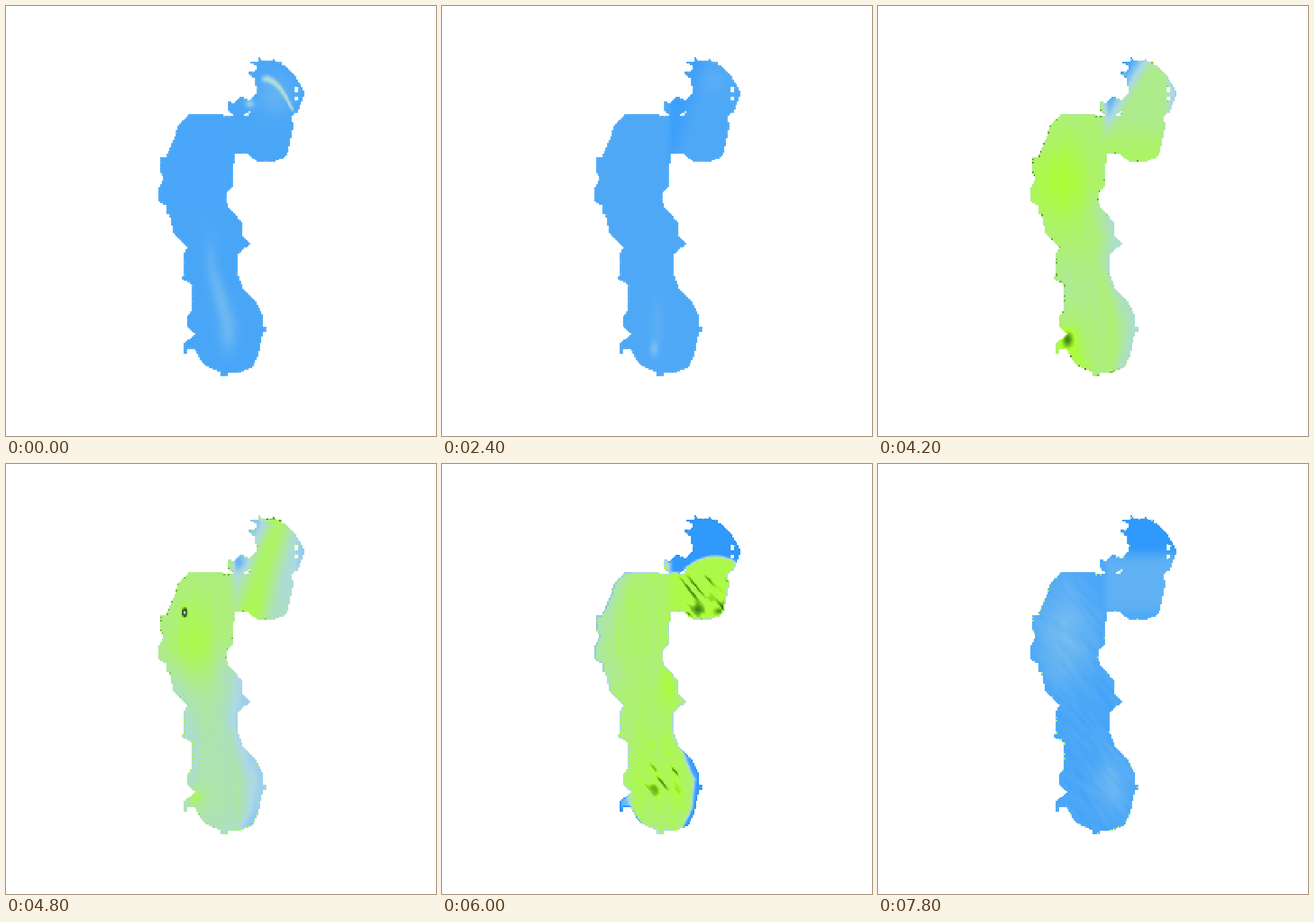
Recreate the animation shown at these times as an HTML page with a canvas. Size 748 px wide and 748 px high, loop 8 s.

```html
<!DOCTYPE html>
<html>
<head>
<meta charset="utf-8">
<style>
html, body { margin: 0; width: 100%; height: 100%; overflow: hidden; background: #fff; }
canvas { position: absolute; left: 265px; top: 89px; width: 253.9px; height: 554.8px; image-rendering: pixelated; }
</style>
</head>
<body>
<canvas id="lake" width="92" height="201"></canvas>
<script>
const CELL = 2.76, W = 92, H = 201, LEFT = 265, TOP = 89;
const STEP = 600, LOOP = 8000;
const ctx = document.getElementById('lake').getContext('2d');

// Shoreline key points; sampling on the grid makes the steps
const shore = [
  'M317 190L335 187H357L387 191H422V186H494L500 208L491 253L484 264L468 270H437L419 257H397L394 314L382 326L386 348L411 377L410 399L425 413L402 433V440H310V428L316 420L291 395L285 365L278 360L279 347L265 340V317L274 300L268 289V263H277L293 230L299 208Z',
  'M310 428H402V464L413 492L434 513L447 538V557H453V566H448L437 612L428 628L407 638H386L385 643H373L374 636L353 629L338 617L329 597H316V604H310V587L328 571L314 557V541L322 531V484L307 475V469H310Z',
  'M424 190V163L437 149L432 126L421 118V114H434L438 105L426 100V97H438L439 89H442L444 95L465 93L469 97H481V101L500 117L518 147V157L507 185L492 194Z',
  'M426 165L408 157L396 169H391V167H387V183L398 192H411L424 182Z'
].map(d => new Path2D(d));
const isles = new Path2D('M503 142H509V150H503ZM503 157H509V164H503Z');

// Blue, pale blue, lime, dark green, grey; anything higher is dry
const ramp = [[30, 144, 255], [173, 216, 230], [173, 255, 47], [24, 84, 16], [112, 112, 112]];
const DRY = 4.5;

const mix = (a, b, k) => a + (b - a) * k;
const ease = (a, b, v) => {
  const k = Math.min(1, Math.max(0, (v - a) / (b - a)));
  return k * k * (3 - 2 * k);
};
const bump = (p, x, y, rx, ry) => Math.exp(-(((p.x - x) / rx) ** 2 + ((p.y - y) / ry) ** 2));

let seed = 7;
const random = () => (seed = seed * 16807 % 2147483647) / 2147483647;

// Smooth noise in -1..1
const N = 64, grid = Array.from({ length: N * N }, () => random() * 2 - 1);
function noise(a, b) {
  const i = Math.floor(a), j = Math.floor(b), u = ease(0, 1, a - i), v = ease(0, 1, b - j);
  const at = (m, n) => grid[(n & 63) * N + (m & 63)];
  return mix(mix(at(i, j), at(i + 1, j), u), mix(at(i, j + 1), at(i + 1, j + 1), u), v);
}
const flow = p => noise(p.x / 9, p.y / 60);
const slant = p => noise((.77 * p.x - .64 * p.y) / 6, (.64 * p.x + .77 * p.y) / 32);

// Middle and half width of the main channel by height
const channel = [[190, 350, 40], [250, 338, 60], [320, 326, 60], [400, 356, 56], [450, 357, 47], [550, 385, 62], [600, 387, 55], [645, 390, 26]];
function across(x, y) {
  let i = 0;
  while (i < channel.length - 2 && channel[i + 1][0] < y) i++;
  const [y0, m0, h0] = channel[i], [y1, m1, h1] = channel[i + 1], k = (y - y0) / (y1 - y0);
  return (x - mix(m0, m1, k)) / mix(h0, h1, k);
}

// Level at a point p: s runs from left bank to right bank, bay is 1 in the northern bay
const states = [
  { at: 0, rim: .06, spot: .25, level(p) {
    const crease = 127 + 51 * ((p.x - 450) / 47) ** 2;
    const bay = .75 * Math.exp(-(((p.y - crease) / 6) ** 2)) * ease(440, 454, p.x) * ease(188, 176, p.y)
      + .18 * bump(p, 468, 155, 30, 35) + .5 * bump(p, 424, 170, 8, 7);
    const spine = Math.exp(-((p.s * 4) ** 2)) * ease(350, 520, p.y) * ease(630, 560, p.y);
    return .3 + mix(.24 * spine, bay, p.bay);
  } },
  { at: 2, rim: .03, spot: 1.5, level: () => .21 },
  { at: 4, rim: .05, spot: .2, level: p =>
    .34 - .13 * p.bay * ease(20, -20, p.x - 445 + (p.y - 130) * .3)
      + .07 * bump(p, 470, 130, 25, 20) + .3 * bump(p, 369, 596, 7, 13) + .08 * bump(p, 375, 550, 12, 40) },
  { at: 7, rim: -.12, spot: .9, level(p) {
    const bay = mix(.3, 1.5, ease(-10, 45, p.x - 440 + (p.y - 100) * .6))
      - .5 * ease(495, 516, p.x) + .2 * ease(190, 260, p.y);
    const right = ease(.4, 1, p.s) * ease(320, 380, p.y);
    const left = ease(.2, .9, -p.s) * ease(540, 580, p.y);
    const main = 1.6 + .35 * bump(p, 318, 310, 48, 75) - .4 * right + .25 * left
      - .15 * bump(p, 345, 490, 30, 50) + .9 * bump(p, 330, 580, 9, 14) + .06 * flow(p);
    return mix(main, bay, p.bay);
  } },
  { at: 9, rim: .12, spot: .9, level(p) {
    const off = p.x - 462 + (p.y - 130) * .28;
    const bay = 1.9 - 1.25 * ease(2, 48, off) - .75 * ease(2, 36, -off)
      - .7 * bump(p, 404, 172, 16, 14) + 2.6 * bump(p, 461, 93, 18, 5);
    const main = mix(1.5, 1.05, ease(320, 430, p.y)) + .2 * bump(p, 335, 310, 30, 60)
      - .45 * ease(.1, 1, p.s) * ease(250, 400, p.y) - .3 * ease(.4, 1, -p.s) * ease(230, 300, p.y)
      - .2 * ease(580, 640, p.y) + .08 * flow(p) + 6 * bump(p, 311, 258, 4, 7);
    return mix(main, bay, p.bay);
  } },
  { at: 10, rim: -.6, spot: .3, level(p) {
    const front = Math.min(188, 159 + 10 * ((p.x - 475) / 36) ** 2);
    const streak = .9 * ease(.15, .9, slant(p));
    const bay = mix(.12, 1.85 + streak * ease(185, 205, p.y), ease(-3, 6, p.y - front))
      + .8 * bump(p, 482, 256, 10, 6);
    const main = 1.65 - .35 * ease(.2, 1, -p.s) * ease(430, 280, p.y) + .08 * flow(p)
      + .2 * bump(p, 390, 390, 18, 40)
      + (.2 + streak) * bump(p, 390, 548, 45, 50)
      - 1.5 * ease(.78, .95, p.s) * ease(480, 520, p.y) - 1.1 * ease(.95, 1.15, -p.s) * ease(560, 590, p.y);
    return mix(main, bay, p.bay);
  } },
  { at: 13, rim: .02, spot: 1.2, level(p) {
    const bay = mix(.12, .46, ease(140, 175, p.y)) - .12 * ease(.5, 1, p.s) * ease(240, 270, p.y);
    const main = .3 + .28 * bump(p, 325, 295, 50, 90) + .22 * bump(p, 408, 555, 30, 52) + .05 * slant(p);
    return mix(main, bay, p.bay);
  } }
];

const place = (i, j) => [LEFT + (i + .5) * CELL, TOP + (j + .5) * CELL];
function isWet(i, j) {
  const [x, y] = place(i, j);
  return shore.some(d => ctx.isPointInPath(d, x, y)) && !ctx.isPointInPath(isles, x, y);
}

const cells = [];
for (let j = 0; j < H; j++) for (let i = 0; i < W; i++) {
  if (!isWet(i, j)) continue;
  const [x, y] = place(i, j);
  const edge = !(isWet(i - 1, j) && isWet(i + 1, j) && isWet(i, j - 1) && isWet(i, j + 1));
  cells.push({
    x, y, edge, k: (j * W + i) * 4, speck: edge && random() < .09,
    s: across(x, y), bay: ease(385, 405, x) * ease(290, 272, y)
  });
}
for (const s of states) {
  s.field = cells.map(c => Math.max(.05, s.level(c) + (c.speck ? s.spot : c.edge ? s.rim : 0)));
}

function draw(step) {
  let n = 0;
  while (n < states.length - 2 && states[n + 1].at <= step) n++;
  const a = states[n], b = states[n + 1], w = (step - a.at) / (b.at - a.at);
  const img = ctx.createImageData(W, H);
  cells.forEach((c, m) => {
    const v = mix(a.field[m], b.field[m], w);
    if (v > DRY) return;
    const q = Math.min(3, Math.floor(v)), k = Math.min(1, v - q);
    for (let h = 0; h < 3; h++) img.data[c.k + h] = mix(ramp[q][h], ramp[q + 1][h], k);
    img.data[c.k + 3] = 255;
  });
  ctx.putImageData(img, 0, 0);
}

let shown = -1;
function tick() {
  const step = Math.floor((performance.now() % LOOP) / STEP);
  if (step !== shown) draw(shown = step);
  requestAnimationFrame(tick);
}
tick();
</script>
</body>
</html>
```
